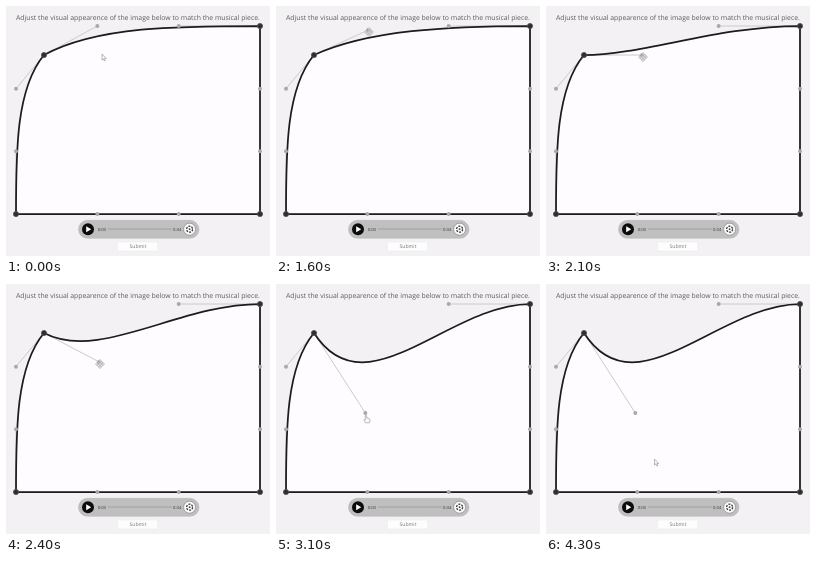
Write an HTML page that moves like this. It is 264 px wide and 250 px high and loops after 4.4 s.

```html
<!DOCTYPE html>
<html lang="en">
<head>
<meta charset="utf-8">
<title>Shape editor</title>
<style>
  html, body { margin: 0; height: 100%; overflow: hidden; background: #f3f1f4; }
  svg { display: block; width: 100vw; height: 100vh; }
  text { font-family: "Open Sans", "Noto Sans", sans-serif; text-rendering: geometricPrecision; }
  #cursor { fill: #fcfcfc; stroke: #8c8c8c; stroke-width: .6; stroke-linejoin: round; }
</style>
</head>
<body>
<svg viewBox="0 0 264 250">
  <text x="10" y="14" font-size="6.87" fill="#5c5c5c">Adjust the visual appearence of the image below to match the musical piece.</text>

  <path id="area" fill="#fefcfe"/>
  <path id="arms" fill="none" stroke="#cbcbcb"/>
  <path id="outline" fill="none" stroke="#1c1c1c" stroke-width="1.75"/>
  <g id="handles" fill="#a9a9a9"></g>
  <g id="anchors" fill="#2e2e2e" stroke="#555" stroke-width=".8"></g>

  <rect x="72.5" y="214.3" width="120.5" height="18" rx="9" fill="#bfbfbf" stroke="#b2b2b2" stroke-width=".5"/>
  <circle cx="82" cy="223.2" r="6" fill="#0c0c0c"/>
  <path d="M80.2 220.2V226.2L85.2 223.2Z" fill="#fff"/>
  <path d="M102 223H166" stroke="#999" stroke-width=".8"/>
  <g font-size="4.2" fill="#333">
    <text x="91.7" y="224.6">0:03</text>
    <text x="167" y="224.6">0:34</text>
  </g>
  <circle cx="183.6" cy="223.2" r="6" fill="#fafafa" stroke="#777" stroke-width=".6"/>
  <circle cx="183.6" cy="223.2" r="3" fill="none" stroke="#333" stroke-width="1.3" stroke-dasharray="2 1.14"/>
  <circle cx="183.6" cy="223.2" r=".9" fill="#444"/>

  <rect x="111.3" y="236" width="40.5" height="9" rx=".6" fill="#fdfdfd" stroke="#e6e6e6" stroke-width=".5"/>
  <text x="132" y="242.3" font-size="5.1" fill="#777" text-anchor="middle">Submit</text>

  <path id="cursor"/>
</svg>
<script>
const LOOP = 4400, STEP = 100;
const $ = id => document.getElementById(id);
const mix = (a, b, k) => a.map((v, i) => v + (b[i] - v) * k);
const clamp = u => Math.min(1, Math.max(0, u));
const easeOut = (u, power) => 1 - (1 - u) ** power;

const cursors = {
  arrow: 'M0 0V6L1.4 4.8L2.4 7L3.4 6.6L2.4 4.5H4.2Z',
  hand: 'M-.7 .6Q0-.6 .7 .6V3L3.4 3.6Q4.2 4 4 5L3.4 7.8H-.4L-2.1 5Q-2.1 4-.7 4.8Z',
  move: 'M0-4.5L1.8-2.6H.6V-.6H2.6V-1.8L4.5 0L2.6 1.8V.6H.6V2.6H1.8L0 4.5L-1.8 2.6H-.6V.6H-2.6V1.8L-4.5 0L-2.6-1.8V-.6H-.6V-2.6H-1.8Z'
};

// Every edge has two handles, at its thirds; then the first corner is pulled inwards.
const corners = [[10, 20], [254, 20], [254, 208], [10, 208]];
const homeHandles = corners.flatMap((from, i) =>
  [1 / 3, 2 / 3].map(k => mix(from, corners[(i + 1) % 4], k)));
const anchors = [[38, 49], ...corners.slice(1)];

// Pointer: approach, drag through evenly timed points, leave.
const start = [96, 48], end = [108.5, 175];
const dragPoints = [[92, 22], [95, 34], [97, 51], [94, 80], [90, 110], [90, 131]];
const press = dragPoints[0], release = dragPoints.at(-1);

function dragAt(t) {
  const u = clamp((t - 1500) / 1500) * (dragPoints.length - 1);
  const i = Math.min(Math.floor(u), dragPoints.length - 2);
  return mix(dragPoints[i], dragPoints[i + 1], u - i);
}

function pointerAt(t) {
  if (t < 900) return mix(start, press, easeOut(t / 900, 5));
  if (t > 3800) return mix(release, end, easeOut(clamp((t - 3800) / 500), 2));
  return dragAt(t);
}

const dots = (points, r) => points.map(([x, y]) => `<circle cx="${x}" cy="${y}" r="${r}"/>`).join('');

function draw(t) {
  const pointer = pointerAt(t), drag = dragAt(t);
  const grabbed = homeHandles[0].map((v, i) => v + drag[i] - press[i]);
  const handles = [grabbed, ...homeHandles.slice(1)];

  let path = `M${anchors[0]}`, arms = '';
  anchors.forEach((from, i) => {
    const to = anchors[(i + 1) % 4], a = handles[2 * i], b = handles[2 * i + 1];
    path += `C${a} ${b} ${to}`;
    arms += `M${from}L${a}M${to}L${b}`;
  });
  $('area').setAttribute('d', path);
  $('outline').setAttribute('d', path + 'Z');
  $('arms').setAttribute('d', arms);
  $('handles').innerHTML = dots(handles, 2);

  const pressed = t >= 1300 && t < 3100;
  const near = Math.hypot(pointer[0] - grabbed[0], pointer[1] - grabbed[1]) < 4;
  $('cursor').setAttribute('d', cursors[pressed ? 'move' : near ? 'hand' : 'arrow']);
  $('cursor').setAttribute('transform', `translate(${pointer})`);
}

$('anchors').innerHTML = dots(anchors, 2.6);
function tick() {
  draw(Math.floor(performance.now() % LOOP / STEP) * STEP);
  requestAnimationFrame(tick);
}
tick();
</script>
</body>
</html>
```
